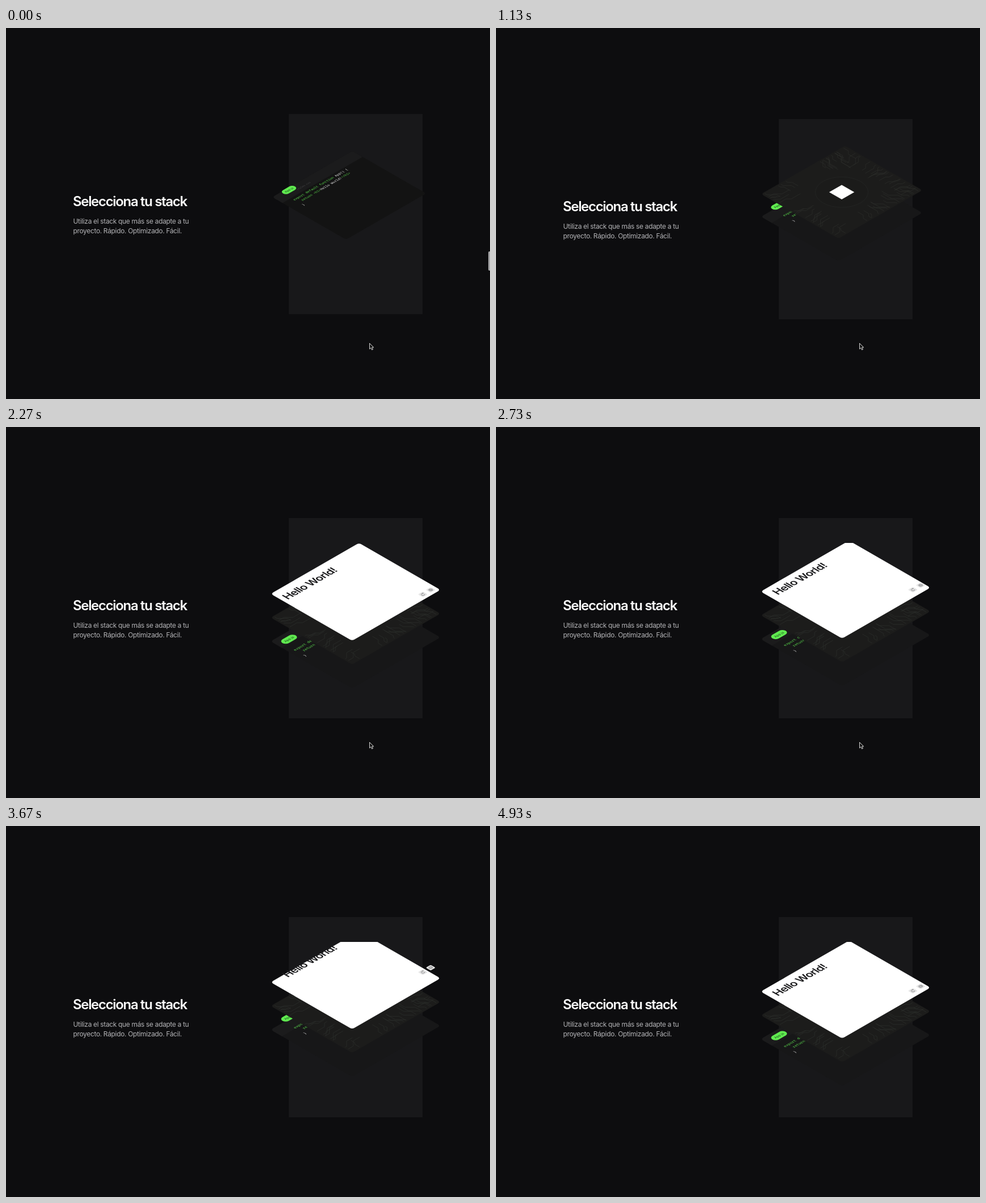
An HTML page that plays this animation: 854x656 px, repeating every 5 s.

```html
<!DOCTYPE html>
<html lang="es">
<head>
<meta charset="utf-8">
<title>Selecciona tu stack</title>
<style>
html, body { margin: 0; width: 100%; height: 100%; overflow: hidden; background: #0d0d0f; }
svg { display: block; width: 854px; height: 656px; }
text { font-family: Inter, sans-serif; white-space: pre; }
.title { font-size: 24px; font-weight: 600; letter-spacing: -1.32px; fill: #fff; }
.body { font-size: 12px; letter-spacing: -.345px; fill: #b3b3b6; }
.code text { font: 500 6.5px "Noto Sans Mono", "DejaVu Sans Mono", monospace; fill: #f2f2f2; }
.code tspan { fill: #5ee050; }
.hello { font-size: 18.7px; font-weight: 600; letter-spacing: -.7px; fill: #19191b; }
</style>
</head>
<body>
<svg viewBox="0 0 854 656">
  <clipPath id="stage"><rect y="205" width="854" height="451"/></clipPath>
  <g id="page">
    <text class="title" x="118" y="323.5">Selecciona tu stack</text>
    <text class="body" x="118.5" y="355">Utiliza el stack que más se adapte a tu</text>
    <text class="body" x="118.5" y="371.5">proyecto. Rápido. Optimizado. Fácil.</text>
    <rect x="499" y="161" width="236" height="354" fill="#18181a"/>
    <g clip-path="url(#stage)">
      <g id="code" class="code">
        <rect width="180" height="166" rx="5" fill="#171718"/>
        <rect id="shade" width="180" height="166" rx="5" fill="#131313"/>
        <path d="M5 0H175a5 5 0 0 1 5 5V23H0V5A5 5 0 0 1 5 0" fill="#1b1b1c"/>
        <text x="42" y="15" style="font-size:5px;fill:#4a4a4c">styles.css</text>
        <g class="lift">
          <rect x="9" y="8.5" width="27" height="13" rx="6.5" fill="#60ea50"/>
          <text x="22.5" y="17" text-anchor="middle" style="font:6px Inter,sans-serif;fill:#16481a">App.js</text>
          <text x="8" y="42"><tspan>export default function</tspan> App() {</text>
          <text x="16" y="52"><tspan>return &lt;h1&gt;</tspan>Hello World!<tspan>&lt;/h1&gt;</tspan></text>
          <text x="8" y="62">}</text>
        </g>
      </g>
      <g id="board">
        <rect width="180" height="166" rx="5" fill="#1c1c1b"/>
        <path id="traces" fill="none" stroke="#2e302d" stroke-width=".6"/>
        <circle cx="90" cy="83" r="40" fill="#1b1b1a" stroke="#282a28" stroke-width=".6"/>
        <rect x="76.5" y="69.5" width="27" height="27" fill="#fff"/>
      </g>
      <g id="view">
        <rect width="180" height="166" rx="5" fill="#fff"/>
        <g class="lift">
          <text class="hello" x="7" y="28">Hello World!</text>
          <g fill="#e6e6e6">
            <rect x="149" y="151" width="10" height="10" rx="2"/>
            <rect x="165" y="151" width="10" height="10" rx="2"/>
          </g>
          <g fill="none" stroke="#77777a" stroke-width=".7">
            <path d="M156.2 154.3a2.6 2.6 0 1 0 .3 3M156.5 153v1.6h-1.6"/>
            <circle cx="170" cy="156" r="2.7" stroke-width="1.2" stroke-dasharray="1.3 .8"/>
            <circle cx="170" cy="156" r="1.5"/>
          </g>
        </g>
      </g>
    </g>
  </g>
  <rect id="bar" x="851" y="395" width="6" height="34" rx="2" fill="#a2a2a4"/>
  <path id="cursor" d="M641.5 557.5v10.2l2.4-2.2 1.6 3.6 1.9-.8-1.6-3.5h2.9z" fill="#111" stroke="#eee" stroke-width=".9"/>
</svg>
<script>
const $ = id => document.getElementById(id);
const lifts = document.querySelectorAll('.lift');
const LOOP = 5000, BOB = 3000, BOB_START = 2270, BOB_HEIGHT = 19;

// Circuit traces run inwards from each edge with one diagonal jog.
let seed = 7;
const rand = () => (seed = seed * 16807 % 2147483647) / 2147483647;
let d = '';
for (let i = 0; i < 68; i++) {
  const side = i % 4, across = side % 2;
  const long = across ? 166 : 180, deep = across ? 180 : 166;
  const start = 5 + rand() * (long - 10);
  const size = 3 + rand() * 8, jog = start < long / 2 ? size : -size;
  const bend = 4 + rand() * 14, end = bend + size + 4 + rand() * 16;
  [[start, 3], [start, bend], [start + jog, bend + size], [start + jog, end]]
    .forEach(([p, q], k) => {
      if (side > 1) q = deep - q;
      d += (k ? 'L' : 'M') + (across ? [q, p] : [p, q]).map(n => n.toFixed(1));
    });
}
$('traces').setAttribute('d', d);

const clamp = x => Math.min(1, Math.max(0, x));
const smooth = x => x * x * (3 - 2 * x);
const ramp = (t, from, to) => clamp((t - from) / (to - from));
const easeOut = x => 1 - (1 - x) ** 3;

// Smooth interpolation through [time, value] keys.
function track(t, keys) {
  let v = keys[0][1];
  for (let i = 1; i < keys.length; i++)
    v += (keys[i][1] - keys[i - 1][1]) * smooth(ramp(t, keys[i - 1][0], keys[i][0]));
  return v;
}

function place(id, x, y, s, alpha = 1) {
  const a = .866 * s, b = .5 * s;
  $(id).setAttribute('transform', `matrix(${a} ${-b} ${a} ${b} ${x} ${y})`);
  $(id).setAttribute('opacity', alpha);
}

function draw(now) {
  const t = now % LOOP;
  const bob = BOB_HEIGHT * (1 - Math.cos(2 * Math.PI * (t - BOB_START) / BOB)) / 2;
  const s = track(t, [[0, .905], [560, .95], [1130, .95], [1650, .93], [2150, 1]]);
  const x = track(t, [[0, 470], [560, 467.7], [1650, 467.7], [2150, 467]]);
  const codeY = track(t, [[0, 317], [560, 350], [1130, 350], [1650, 339], [2150, 379]]) - bob;
  const board = easeOut(ramp(t, 60, 540));
  const view = easeOut(ramp(t, 1690, 2150));
  const gap = track(t, [[1650, 40], [2150, 42]]);
  const boardY = codeY - gap * board;

  place('code', x, codeY, s);
  place('board', x, boardY, s, clamp(board * 1.4));
  place('view', x, boardY - gap * view, s, clamp(view * 1.4));
  // Straight up on screen is (+x, -y) in plane coordinates.
  const up = bob / s;
  lifts.forEach(g => g.setAttribute('transform', `translate(${up} ${-up})`));

  $('shade').setAttribute('opacity', 1 - board);
  $('page').setAttribute('transform', `translate(0 ${-9 * (1 - ramp(t, 0, 450)) ** 3})`);
  $('bar').setAttribute('opacity', 1 - ramp(t, 150, 400));
  $('cursor').setAttribute('opacity', t < 2970 ? 1 : 0);
}

const began = performance.now();
function frame() {
  draw(performance.now() - began);
  requestAnimationFrame(frame);
}
draw(0);
requestAnimationFrame(frame);
</script>
</body>
</html>
```
